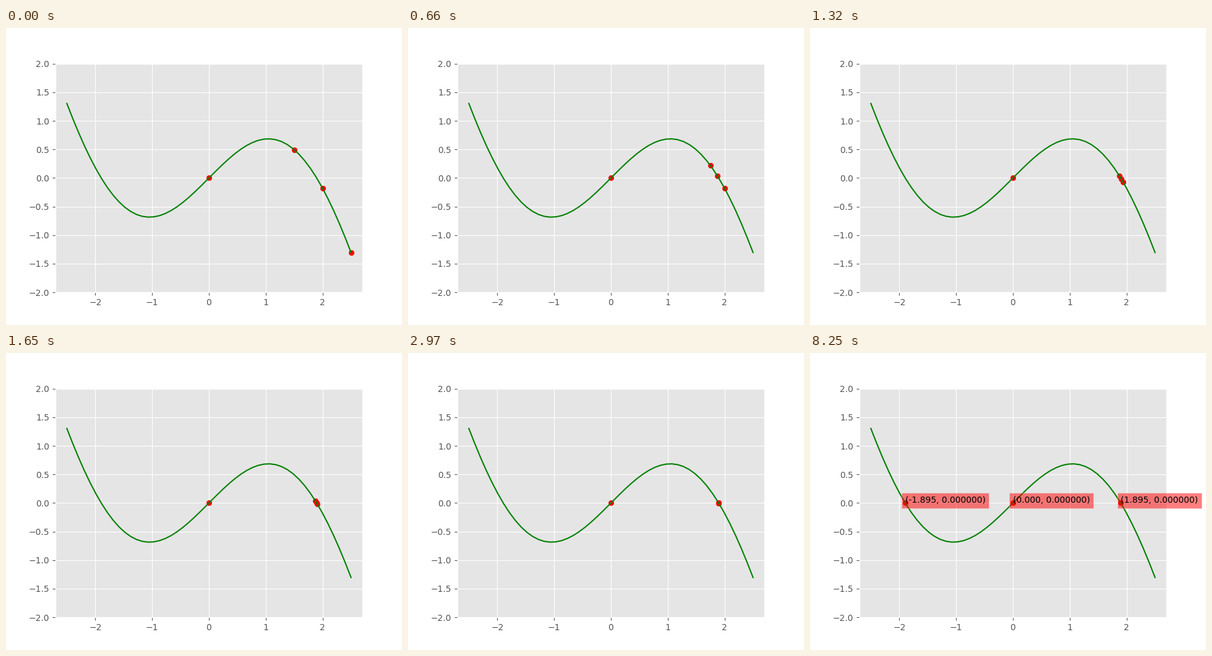
Animation of 640 by 480 pixels, one loop 8580 ms. Source, as a matplotlib script:

```python
import numpy as np
import matplotlib.pyplot as plt
from matplotlib.animation import FuncAnimation

STEPS = 25        # bisection steps shown before the labelled result
INTERVAL = 330    # ms per step


def f(x):
    return 2 * np.sin(x) - x


def bisect(lo, hi, steps):
    """Return the bracket [lo, hi] after the given number of halvings."""
    for _ in range(steps):
        mid = (lo + hi) / 2
        if f(lo) * f(mid) <= 0:
            hi = mid
        else:
            lo = mid
    return lo, hi


plt.style.use("ggplot")
plt.rcParams["font.family"] = "DejaVu Sans"

fig, ax = plt.subplots(figsize=(6.4, 4.8), dpi=100)
ax.set_xlim(-2.7, 2.7)
ax.set_ylim(-2, 2)

xs = np.linspace(-2.5, 2.5, 50)
ax.plot(xs, f(xs), color="green")
dots = ax.scatter([], [], color="red")

root = sum(bisect(1.5, 2.5, 40)) / 2
roots = np.array([-root, 0.0, root])
labels = [
    ax.text(x, 0, f"({x:.3f}, {abs(f(x)):.6f})", color="black",
            bbox=dict(facecolor="red", alpha=0.5))
    for x in roots
]


def update(step):
    done = step == STEPS
    if done:
        points = roots
    else:
        lo, hi = bisect(1.5, 2.5, step)
        points = np.array([0.0, lo, hi, (lo + hi) / 2])
    dots.set_offsets(np.column_stack([points, f(points)]))
    for label in labels:
        label.set_visible(done)
    return [dots, *labels]


anim = FuncAnimation(fig, update, frames=STEPS + 1, interval=INTERVAL,
                     repeat=True, repeat_delay=0, blit=False)
plt.show()
```
